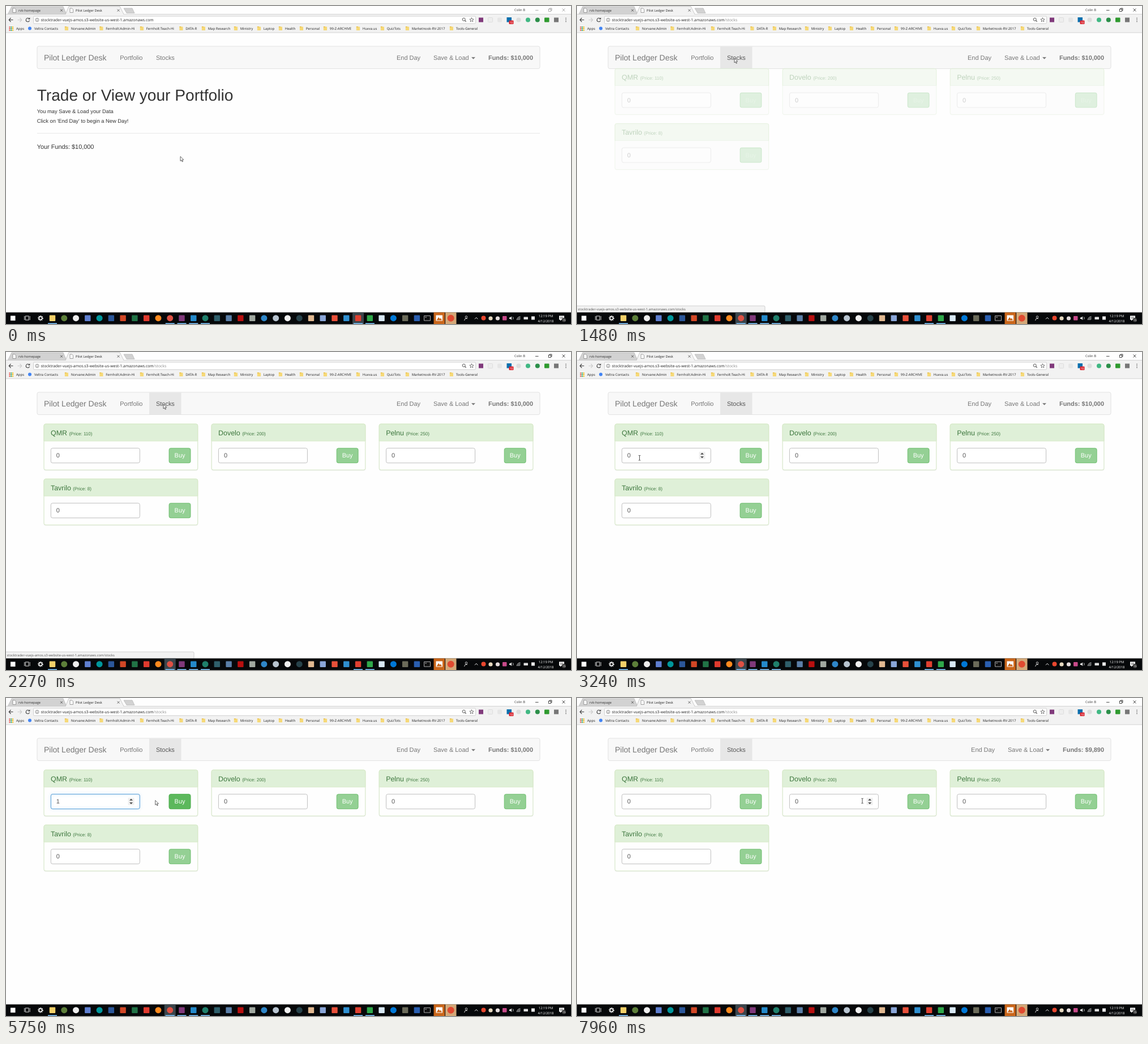
Animation, 998 px wide and 561 px high, one loop 8 s. Source, as an HTML page with a canvas:

```html
<!DOCTYPE html>
<html lang="en">
<head>
<meta charset="utf-8">
<title>Pilot Ledger Desk</title>
<style>
  html, body { margin: 0; width: 100%; height: 100%; overflow: hidden; background: #fefefe; }
  canvas { display: block; }
</style>
</head>
<body>
<canvas id="stage" width="998" height="561"></canvas>
<script>
const g = document.getElementById('stage').getContext('2d');
g.textRendering = 'geometricPrecision';
const LOOP = 8000;
const ARIAL = '"Liberation Sans", Arial, sans-serif';
const UI = '"Open Sans", "Noto Sans", sans-serif';
const HOST = 'stocktrader-vuejs-amos.s3-website-us-west-1.amazonaws.com';
const APP = 'Pilot Ledger Desk';

// Moments of the interaction, in ms
const FOCUS_WINDOW = 1000, LEAVE = 1220, ROUTE = 1270, ENTER = 1445;
const STEP_UP = 5170, BUY = 6570;

const BOOKMARKS = [
  [107, 'Norvane:Admin'], [168.5, 'Fernholt:Admin-Hi'], [240, 'Fernholt:Teach-Hi'],
  [309.5, 'DATA-R'], [349, 'Map Research'], [406, 'Ministry'], [447, 'Laptop'],
  [485, 'Health'], [522, 'Personal'], [564, '99-Z-ARCHIVE'], [622, 'Huvva.us'],
  [665, 'QuizTots'], [709, 'Marketnook-RV-2017'], [787, 'Tools-General']
];
const APPS = ('s#f3d069 c#5d7f3a c#eeeeee s#5f7fd0 c#00979c s#2b579a s#d24726 s#217346 s#e03a2e ' +
  'c#ff8a1e c#dd5144 s#80397b s#2489ca c#1f7f6b s#2f5f6b s#5b7fa8 s#b81010 s#a0a8a0 c#2f86c8 ' +
  'c#b8c4d0 c#f0f0f0 c#27424a s#e0b890 s#8aa6d8 s#e8503a s#2f8fd0 s#e04030 s#2fa84a s#d8e8f4 ' +
  'c#0078d7 s#6b6b5a s#2a5fb0').split(' ');
const OPEN_APPS = [0, 10, 11, 12, 13, 26, 27];
const STOCKS = [
  ['QMR', 110, 0, 0], ['Dovelo', 200, 1, 0], ['Pelnu', 250, 2, 0], ['Tavrilo', 8, 0, 1]
];
const POINTER = [
  [0, 308, 265.5], [100, 308, 265.5], [270, 305, 262.5], [510, 305, 262.5],
  [820, 278, 92], [2270, 278, 92], [3060, 108, 187], [3100, 108, 187],
  [4700, 220, 179.5], [5510, 220, 179.5], [5960, 299, 181.5], [7000, 299, 181.5],
  [7960, 504, 181.5], [LOOP, 504, 181.5]
];

const clamp = v => Math.max(0, Math.min(1, v));
const smooth = v => v * v * (3 - 2 * v);
const easeOut = v => 1 - (1 - clamp(v)) ** 1.7;

function box(x, y, w, h, fill, stroke, r = 0) {
  g.beginPath();
  g.roundRect(x, y, w, h, r);
  if (fill) { g.fillStyle = fill; g.fill(); }
  if (stroke) { g.strokeStyle = stroke; g.lineWidth = 1; g.stroke(); }
}
function disc(x, y, r, fill) {
  g.beginPath();
  g.arc(x, y, r, 0, 7);
  g.fillStyle = fill;
  g.fill();
}
function ring(x, y, r, color, width = 1, from = 0, to = 7) {
  g.beginPath();
  g.arc(x, y, r, from, to);
  g.strokeStyle = color;
  g.lineWidth = width;
  g.stroke();
}
function trace(points) {
  g.beginPath();
  for (let i = 0; i < points.length; i += 2) g.lineTo(points[i], points[i + 1]);
}
function line(points, color, width = 1) {
  trace(points);
  g.strokeStyle = color;
  g.lineWidth = width;
  g.stroke();
}
function shape(points, fill, stroke, width = .7) {
  trace(points);
  g.closePath();
  g.fillStyle = fill;
  g.fill();
  if (stroke) { g.strokeStyle = stroke; g.lineWidth = width; g.stroke(); }
}
// Draws text and returns its width
function text(s, x, y, size, color, align = 'left', family = ARIAL, weight = '') {
  g.font = `${weight} ${size}px ${family}`;
  g.textAlign = align;
  g.fillStyle = color;
  g.fillText(s, x, y);
  return g.measureText(s).width;
}
const label = (s, x, y, size, color, align) => text(s, x, y, size, color, align, UI);

function pointerAt(t) {
  const i = Math.max(1, POINTER.findIndex(k => k[0] > t));
  const [t0, x0, y0] = POINTER[i - 1], [t1, x1, y1] = POINTER[i];
  const p = smooth((t - t0) / (t1 - t0));
  return { x: x0 + (x1 - x0) * p, y: y0 + (y1 - y0) * p };
}

function drawTabs(active) {
  shape([3, 15, 10, 1, 101, 1, 107, 15], '#d2d2d2', '#b4b4b4');
  box(0, 14.5, 998, 32.5, '#f2f2f2');
  line([0, 14.5, 998, 14.5], '#c4c4c4', .7);
  shape([105, 15.5, 111, 1, 201, 1, 208, 15.5], '#f2f2f2');
  line([105, 14.5, 111, .7, 201, .7, 208, 14.5], '#b4b4b4', .7);
  shape([208, 4, 223, 4, 227, 12.5, 213, 12.5], '#d2d2d2', '#b4b4b4');
  for (const x of [12, 113]) shape([x, 4, x + 3.5, 4, x + 5.5, 6, x + 5.5, 11.5, x, 11.5], '#fff', '#666', .6);
  label('rvk-homepage', 22, 10, 5.8, '#333');
  label(APP, 123, 10, 5.8, '#222');
  for (const x of [98, 198.5]) {
    line([x - 2, 5.7, x + 2, 9.7], '#444', .8);
    line([x + 2, 5.7, x - 2, 9.7], '#444', .8);
  }
  label('Colin B', 898, 9, 5.8, '#333');
  const ink = active ? '#222' : '#999';
  line([935, 7.5, 940.5, 7.5], ink, .8);
  g.lineWidth = .8;
  g.strokeStyle = ink;
  g.strokeRect(958.5, 5.5, 4, 4);
  line([960, 5, 960, 4, 964, 4, 964, 8, 963, 8], ink, .8);
  line([982.5, 4.5, 987.5, 9.5], ink, .8);
  line([987.5, 4.5, 982.5, 9.5], ink, .8);
}

function drawToolbar(path) {
  const arrow = (x, dir, color) => {
    line([x - 3.5, 24.5, x + 3.5, 24.5], color, 1.1);
    line([x + dir * .5, 21, x + dir * 3.8, 24.5, x + dir * .5, 28], color, 1.1);
  };
  arrow(9, -1, '#444');
  arrow(24, 1, '#ccc');
  ring(38.5, 24.5, 3.2, '#444', 1.1, .3, 5.5);
  shape([39, 23.5, 42.3, 23.5, 42.3, 20.3], '#444');
  box(48.5, 18, 781, 13, '#fff', '#d0d0d0', 1.5);
  ring(55, 24.5, 3, '#555', .7);
  line([55, 24, 55, 26.3], '#555', .8);
  line([55, 22.4, 55, 23.2], '#555', .8);
  const w = label(HOST, 61.5, 27, 6.87, '#222');
  label(path, 61.5 + w, 27, 6.87, '#888');

  ring(808.7, 23.7, 2.5, '#444', .9);
  line([810.5, 25.5, 812.7, 27.7], '#444', 1.1);
  const star = [];
  for (let i = 0; i < 10; i++) {
    const r = i % 2 ? 1.7 : 3.9, a = i * Math.PI / 5;
    star.push(822.5 + r * Math.sin(a), 24.5 - r * Math.cos(a));
  }
  shape(star, '#fff', '#444');

  box(835, 20.5, 8, 8, '#80397b');
  box(851.5, 20.5, 8, 8, '#eee', '#ddd', 1);
  box(868, 20.5, 8, 8, '#e6e6e6', null, 2);
  box(884.5, 20, 8.5, 8.5, '#0a6fae');
  box(888.5, 25.5, 8, 6.5, '#d9232e', null, 1);
  label('10', 892.5, 31, 5, '#fff', 'center');
  disc(905.5, 24.5, 4, '#ddd');
  disc(922, 24.5, 4, '#41b883');
  disc(938.8, 24.5, 4, '#2c8f4a');
  box(951, 20.5, 8.5, 8, '#2f9a2f', null, 1);
  box(968, 20.5, 8, 8, '#777');
  for (const y of [21.5, 24.5, 27.5]) disc(989, y, .8, '#444');
}

function drawBookmarks() {
  for (let i = 0; i < 9; i++)
    box(5.5 + i % 3 * 2.8, 36.3 + Math.floor(i / 3) * 2.8, 1.9, 1.9, ['#db4437', '#0f9d58', '#f4b400'][i % 3]);
  label('Apps', 18, 41.8, 6, '#222');
  disc(42, 39.5, 3, '#4285f4');
  label('Veltra Contacts', 50, 41.8, 6, '#222');
  for (const [x, name] of BOOKMARKS) {
    box(x - 3.2, 36.5, 6.2, 6.5, '#f6d978', null, .6);
    box(x - 3.2, 36, 3, 1.5, '#e9c14f');
    label(name, x + 7.7, 41.8, 6, '#222');
  }
  line([0, 47, 998, 47], '#c8c8c8', .8);
}

function drawTaskbar(active) {
  box(0, 540.5, 998, 20.5, '#06080a');
  box(8, 546.5, 8.5, 8.5, '#fff');
  g.lineWidth = 1;
  g.strokeStyle = '#ddd';
  g.strokeRect(34.5, 547, 5.5, 7);
  line([32.5, 547, 32.5, 554], '#ddd', .9);
  line([42.2, 547, 42.2, 554], '#ddd', .9);
  g.setLineDash([1.5, 1.5]);
  ring(61, 550.7, 4, '#fff', 1.6);
  g.setLineDash([]);
  ring(61, 550.7, 2.7, '#fff', 1.4);

  const focused = active ? 10 : 26;
  APPS.forEach((app, i) => {
    const x = 82 + i * 20.77, color = app.slice(1);
    if (i === focused) box(x - 10, 540.5, 20, 20.5, '#3b454b');
    if (app[0] === 's') box(x - 5.2, 545.5, 10.4, 10.4, color, null, 1);
    else disc(x, 550.7, 5.5, color);
    if (OPEN_APPS.includes(i)) box(x - 8, 559.3, 16, 1.7, '#76b9ed');
  });
  box(738.5, 546.5, 11, 8.5, '#111', '#aaa');
  line([740, 549, 743, 549], '#ddd', .8);
  box(755.5, 540.5, 19.5, 20.5, '#c9661b');
  box(759.5, 545.5, 11.5, 10, '#fff');
  shape([760.5, 554.5, 764, 549, 766.5, 552, 768, 550.5, 770, 554.5], '#c9661b');
  box(776, 540.5, 19.5, 20.5, '#d3a878');
  disc(785.7, 550.7, 6, '#e04a30');

  ring(813, 548.6, 1.8, '#ddd', .9);
  line([809.5, 555, 811, 551.5, 815, 551.5], '#ddd', .9);
  line([828, 552.3, 830.7, 549.5, 833.4, 552.3], '#eee', 1);
  disc(843.5, 550.5, 4, '#e8472f');
  disc(856, 551, 3.6, '#e6d9c0');
  disc(868.5, 551, 3.6, '#e4dcdc');
  box(877, 547, 7.5, 7.5, '#c84a8a', null, 1);
  shape([889, 549.5, 891, 549.5, 893, 547.5, 893, 554, 891, 552, 889, 552], '#fff');
  ring(893, 550.7, 3, '#fff', .8, -.9, .9);
  for (const r of [2, 4, 6]) ring(908.5, 554, r, '#eee', .9, Math.PI, Math.PI * 1.5);
  box(914.5, 548.5, 7.5, 4.5, '#ddd', null, .5);
  box(928, 547.5, 6, 6, '#e8e8e8');
  label('12:19 PM', 953.5, 548.5, 5.9, '#fff', 'center');
  label('4/12/2018', 953.5, 557.5, 5.9, '#fff', 'center');
  shape([977, 546.5, 986, 546.5, 986, 553.5, 981, 553.5, 979, 555.5, 979, 553.5, 977, 553.5], '#fff');
  line([978.5, 549, 984.5, 549], '#222', .7);
  line([978.5, 551, 984.5, 551], '#222', .7);
  disc(985.5, 554, 3.7, '#333');
  label('15', 985.5, 556, 5, '#fff', 'center');
}

function drawNav(t, mouse) {
  const funds = t < BUY ? '$10,000' : '$9,890';
  const over = mouse.x > 253 && mouse.x < 310 && mouse.y > 71 && mouse.y < 111;
  box(55, 71, 888, 39.5, '#f8f8f8', '#e2e2e2', 3);
  if (t >= ROUTE) box(253, 71.5, 56.5, 38.5, '#e7e7e7');
  text(APP, 67, 95.5, 14, '#777');
  text('Portfolio', 201.3, 94.5, 10.95, '#777');
  text('Stocks', 265, 94.5, 10.95, t >= ROUTE ? '#555' : over ? '#333' : '#777');
  const w = text('Funds: ' + funds, 931, 94.5, 10.95, '#777', 'right', ARIAL, 'bold');
  const x = 931 - w;
  text('End Day', x - 120, 94.5, 10.95, '#777', 'right');
  text('Save & Load', x - 97, 94.5, 10.95, '#777');
  shape([x - 30, 90.3, x - 23, 90.3, x - 26.5, 93.8], '#777');
}

function drawHome() {
  text('Trade or View your Portfolio', 54.7, 167, 28.1, '#333');
  text('You may Save & Load your Data', 54.7, 188.5, 9.33, '#333');
  text("Click on 'End Day' to begin a New Day!", 54.7, 206.2, 9.33, '#333');
  line([55, 224.5, 943, 224.5], '#e8e8e8', 1);
  text('Your Funds: $10,000', 54.7, 252, 10.9, '#333');
}

function drawSpinner(x, y, upHover) {
  box(x - 5.5, y - 6.5, 11, 13, '#f0f0f0');
  if (upHover) box(x - 5.5, y - 6.5, 11, 6.5, '#c6c6c6');
  shape([x - 3, y - 1.7, x + 3, y - 1.7, x, y - 4.7], '#444');
  shape([x - 3, y + 1.7, x + 3, y + 1.7, x, y + 4.7], '#444');
}

function drawPanel(t, mouse, [name, price, col, row]) {
  const x = 67 + col * 296.1, y = 127 + row * 97;
  const first = !col && !row;
  const bought = first && t >= STEP_UP && t < BUY;
  const hit = (x0, x1) => mouse.x > x0 && mouse.x < x1 && mouse.y > y + 42 && mouse.y < y + 69;

  g.save();
  g.shadowColor = 'rgba(0,0,0,.06)';
  g.shadowOffsetY = 1;
  g.shadowBlur = 1;
  box(x, y, 271.7, 81, '#fefefe', '#d6e9c6', 3);
  g.restore();
  box(x, y, 271.7, 30, '#dff0d8', '#d6e9c6', [3, 3, 0, 0]);
  const w = text(name, x + 12, y + 19.5, 12.4, '#3c763d');
  text(`(Price: ${price})`, x + 15.5 + w, y + 19.5, 8.05, '#3c763d');

  const glow = first ? clamp((t - STEP_UP) / 150) - clamp((t - BUY) / 150) : 0;
  box(x + 12.3, y + 42.7, 157, 26, '#fff', '#bfbfbf', 3);
  if (glow > 0) {
    g.save();
    g.globalAlpha *= glow;
    g.shadowColor = 'rgba(102,175,233,.6)';
    g.shadowBlur = 5;
    box(x + 12.3, y + 42.7, 157, 26, null, '#66afe9', 3);
    g.restore();
  }
  text(bought ? '1' : '0', x + 21.8, y + 59.3, 10.9, '#555');
  if (bought && Math.floor((t - 5240) / 500) % 2 === 0)
    line([x + 28.7, y + 50, x + 28.7, y + 61.5], '#333', .7);
  if (bought || hit(x + 12, x + 170))
    drawSpinner(x + 154, y + 55.5, hit(x + 148, x + 160) && mouse.y < y + 55.5);

  g.save();
  if (!bought) g.globalAlpha *= .65;
  const dark = bought && hit(x + 220, x + 260);
  box(x + 221, y + 42.7, 38, 26, dark ? '#449d44' : '#5cb85c', dark ? '#398439' : '#4cae4c', 3);
  g.restore();
  text('Buy', x + 240, y + 59.3, 10.9, '#fff', 'center');
}

function drawPage(t, mouse) {
  g.save();
  if (t < ENTER) {
    const p = t < ROUTE ? 0 : easeOut((t - LEAVE) / 200);
    g.globalAlpha = 1 - p;
    g.translate(0, -23.3 * p);
    drawHome();
  } else {
    const p = easeOut((t - ENTER) / 200);
    g.globalAlpha = p;
    g.translate(0, -23.3 * (1 - p));
    STOCKS.forEach(stock => drawPanel(t, mouse, stock));
  }
  g.restore();
}

function drawStatus() {
  box(-3, 529, 335, 14, '#f2f2f2', '#d0d0d0', 2);
  label(HOST + '/stocks', 1.5, 537.3, 5.9, '#555');
}

function drawPointer({ x, y }) {
  const inField = y > 169 && y < 196 &&
    [79, 375].some(l => x > l && x < l + 157 && !(x > l + 136 && x < l + 149));
  g.save();
  g.translate(x, y);
  if (inField) {
    line([-1.7, -4.3, -.5, -4.3, 0, -3.8, .5, -4.3, 1.7, -4.3], '#222', .8);
    line([-1.7, 4.3, -.5, 4.3, 0, 3.8, .5, 4.3, 1.7, 4.3], '#222', .8);
    line([0, -4, 0, 4], '#222', .8);
  } else {
    shape([0, 0, 0, 8, 1.9, 6.3, 3.2, 9.3, 4.5, 8.8, 3.3, 5.8, 5.7, 5.6], '#fff', '#222', .7);
  }
  g.restore();
}

function frame(now) {
  const t = now % LOOP, mouse = pointerAt(t), active = t >= FOCUS_WINDOW;
  box(0, 0, 998, 561, '#fefefe');
  drawTabs(active);
  drawToolbar(t < ROUTE ? '' : '/stocks');
  drawBookmarks();
  drawNav(t, mouse);
  drawPage(t, mouse);
  if (t > 790 && t < 2600) drawStatus();
  drawTaskbar(active);
  drawPointer(mouse);
  requestAnimationFrame(frame);
}
requestAnimationFrame(frame);
</script>
</body>
</html>
```
